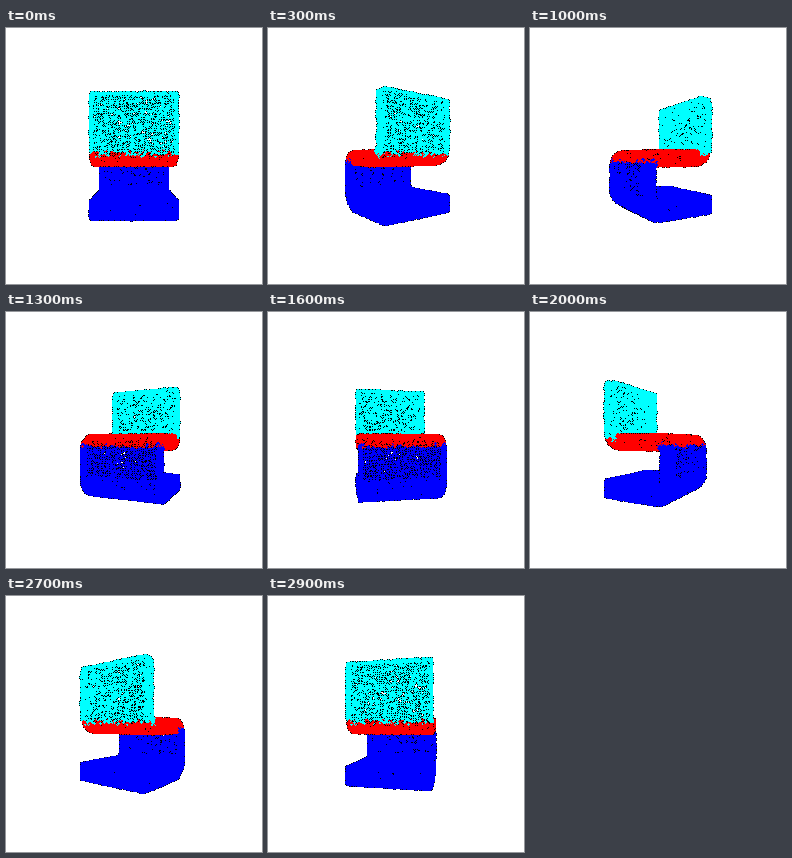
A matplotlib script that plays this animation: 256 px wide and 256 px high, repeating every 3 s.

```python
import numpy as np
import matplotlib.pyplot as plt
from matplotlib.animation import FuncAnimation

SIZE, FRAMES = 256, 30
CAMERA = 228.0          # camera distance, also the focal length
HALF_W = 36.7           # half of the chair's width
MAX_DENSITY = 1.5       # points per unit of surface
WHITE, BLACK, CYAN, RED, BLUE = range(5)
PALETTE = np.array([[255, 255, 255], [0, 0, 0], [0, 255, 255],
                    [255, 0, 0], [0, 0, 255]], dtype=np.uint8)

rng = np.random.default_rng(7)


def rounded_path(corners, radii):
    """Polyline in (z, y) with circular right-angle bends, evenly resampled."""
    pts = [corners[0]]
    phi = np.linspace(0, np.pi / 2, 16)[:, None]
    for prev, c, nxt, r in zip(corners, corners[1:], corners[2:], radii):
        u = (prev - c) / np.linalg.norm(prev - c)
        v = (nxt - c) / np.linalg.norm(nxt - c)
        pts.extend(c + r * (u + v) - r * (v * np.cos(phi) + u * np.sin(phi)))
    pts = np.array(pts + [corners[-1]])
    length = np.r_[0, np.cumsum(np.hypot(*np.diff(pts, axis=0).T))]
    s = np.linspace(0, length[-1], 1200)
    return s, np.stack([np.interp(s, length, pts[:, k]) for k in (0, 1)], 1)


def build_chair():
    corners = np.array([[30.2, -53.5], [30.2, 2], [-30.2, 2],
                        [-30.2, 45.8], [36, 45.8]])
    s, path = rounded_path(corners, [11, 7, 12])
    total = s[-1]
    tangent = np.gradient(path, s, axis=0)
    tangent /= np.linalg.norm(tangent, axis=1, keepdims=True)
    normal = np.stack([-tangent[:, 1], tangent[:, 0]], 1)

    def place(t, side, x):
        """Points at path length t, sideways by side (-1..1) half thicknesses."""
        half = np.interp(t, [total - 78, total - 58], [6.1, 7.6])
        z, y = (np.interp(t, s, path[:, k])
                + side * half * np.interp(t, s, normal[:, k]) for k in (0, 1))
        return np.stack([x, y, z], 1)

    def count(area):
        return int(area * MAX_DENSITY)

    n_face, n_side = count(4 * HALF_W * total), count(26 * total)
    n_end = count(56 * HALF_W)
    faces = place(rng.uniform(0, total, n_face), rng.choice([-1, 1], n_face),
                  rng.uniform(-HALF_W, HALF_W, n_face))
    sides = place(rng.uniform(0, total, n_side), rng.uniform(-1, 1, n_side),
                  rng.choice([-HALF_W, HALF_W], n_side))
    ends = place(rng.choice([0, total], n_end), rng.uniform(-1, 1, n_end),
                 rng.uniform(-HALF_W, HALF_W, n_end))
    surface = np.concatenate([faces, sides, ends])
    return surface + rng.normal(0, 0.25, surface.shape)


def paint(points):
    """Colour each point by part and thin the parts to their density."""
    x, y, z = points.T
    noise = rng.normal(0, 1.2, len(points))
    back = (z > 22) & (y < noise - 0.5)
    leg = (y > 9) | ((z < -22) & (y > 4.5 + noise))
    color = np.where(back, CYAN, np.where(leg, BLUE, RED))

    inner_edge = np.abs(x) < HALF_W - 1
    support = leg & (z < -20) & (y < 33) & inner_edge
    density = np.select([support & (z < -34), support, back & inner_edge, back, ~leg],
                        [0.25, 0.45, 0.3, 0.5, 0.8], MAX_DENSITY)
    keep = rng.random(len(points)) < density / MAX_DENSITY
    return points[keep], color[keep]


points, colors = paint(build_chair())

# Each point is a tiny ball: a bright cross whose dark corners lie deeper.
RIM_DEPTH = 8.0
CROSS = [(0, 0), (1, 0), (-1, 0), (0, 1), (0, -1)]
RIM = [(1, 1), (1, -1), (-1, 1), (-1, -1)]


def render(angle):
    x, y, z = points.T
    c, s = np.cos(angle), np.sin(angle)
    depth = z * c - x * s
    scale = CAMERA / (CAMERA - depth)
    col = np.floor(SIZE / 2 + (x * c + z * s) * scale).astype(int)
    row = np.floor(SIZE / 2 + y * scale).astype(int)

    index = np.concatenate([(row + dy) * SIZE + col + dx for dx, dy in CROSS + RIM])
    near = np.concatenate([depth] * len(CROSS) + [depth - RIM_DEPTH] * len(RIM))
    shade = np.concatenate([colors] * len(CROSS)
                           + [np.full(len(colors), BLACK)] * len(RIM))
    order = np.argsort(near, kind="stable")
    canvas = np.full(SIZE * SIZE, WHITE)
    canvas[index[order]] = shade[order]
    return PALETTE[canvas.reshape(SIZE, SIZE)]


fig = plt.figure(figsize=(2.56, 2.56), dpi=100, facecolor="white")
ax = fig.add_axes([0, 0, 1, 1])
ax.axis("off")
image = ax.imshow(render(0), interpolation="nearest", aspect="auto")


def update(i):
    image.set_data(render(2 * np.pi * i / FRAMES))
    return [image]


anim = FuncAnimation(fig, update, frames=FRAMES, interval=100,
                     repeat=True, repeat_delay=0, blit=False)
plt.show()
```
